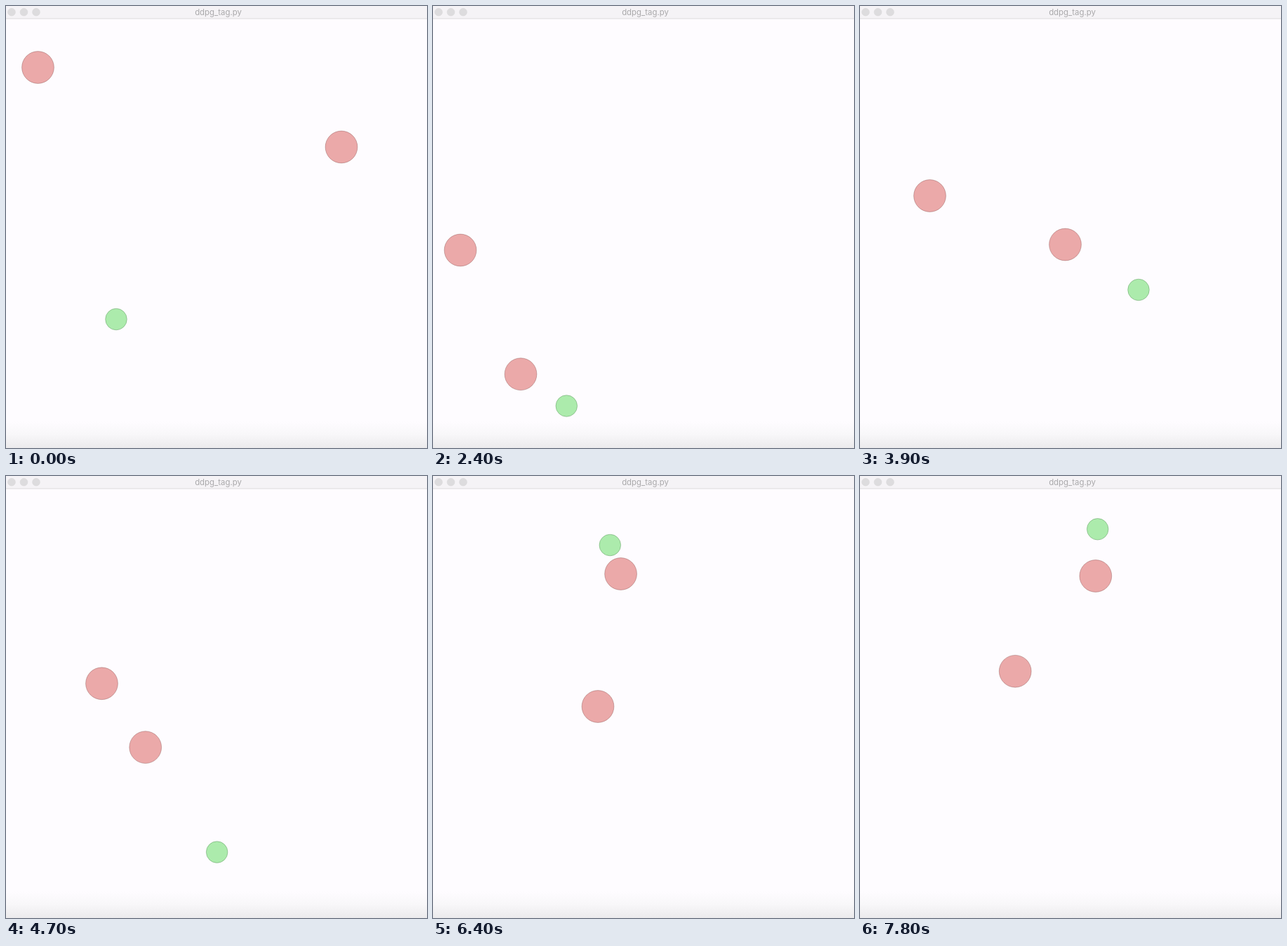
Recreate the animation shown at these times as an HTML page. Size 600 by 630 pixels, loop 7900 ms.

```html
<!DOCTYPE html>
<html lang="en">
<head>
<meta charset="utf-8">
<title>Tag</title>
<style>
  html, body { margin: 0; width: 100%; height: 100%; overflow: hidden; background: #fefcff; }
  svg { display: block; width: 600px; height: 630px; }
  text { font: 400 11.4px Inter, Roboto, sans-serif; fill: #aaa9ab; text-anchor: middle; }
  .chaser { fill: rgba(217, 88, 85, .5); stroke: rgba(108, 45, 45, .4); }
  .runner { fill: rgba(89, 217, 89, .5); stroke: rgba(45, 108, 45, .4); }
  .chaser, .runner { stroke-width: .8; }
  .button { fill: #dddcde; stroke: #d6d5d7; stroke-width: .5; }
</style>
</head>
<body>
<svg viewBox="0 0 600 630">
  <defs>
    <linearGradient id="shade" x1="0" y1="0" x2="0" y2="1">
      <stop offset="0" stop-color="#fefcff"/>
      <stop offset=".5" stop-color="#f8f7f9"/>
      <stop offset="1" stop-color="#ebeaec"/>
    </linearGradient>
  </defs>
  <rect width="600" height="630" fill="#fefcff"/>
  <rect y="592" width="600" height="38" fill="url(#shade)"/>
  <rect width="600" height="18" fill="#f5f3f6"/>
  <rect y="17.5" width="600" height="1" fill="#dddcde"/>
  <circle class="button" cx="8" cy="8.7" r="5.4"/>
  <circle class="button" cx="25.5" cy="8.7" r="5.4"/>
  <circle class="button" cx="43" cy="8.7" r="5.4"/>
  <text x="302.5" y="13">ddpg_tag.py</text>
  <circle id="guard" class="chaser" r="22.9"/>
  <circle id="hunter" class="chaser" r="22.9"/>
  <circle id="runner" class="runner" r="15.3"/>
</svg>
<script>
const STEP = 100, LOOP = 7900, TAU = 2 * Math.PI;
const MIN_SWEEP = 4.4;

// Key poses; the runner circles the field between them
const poses = [
  { at: 0,  guard: [45.5, 87.5],   hunter: [478, 201],     runner: [157, 446.5] },
  { at: 10, guard: [130, 344],     hunter: [181.5, 411],   runner: [108.2, 403.5] },
  { at: 24, guard: [39, 348],      hunter: [125, 524.7],   runner: [190.3, 570] },
  { at: 39, guard: [99.5, 270.5],  hunter: [292.5, 340],   runner: [397, 404.5] },
  { at: 55, guard: [173.5, 321],   hunter: [276.3, 333],   runner: [205.8, 314] },
  { at: 64, guard: [235, 328.5],   hunter: [267.6, 139.5], runner: [252.3, 98.5] },
  { at: 78, guard: [221.2, 278.3], hunter: [335.8, 142.5], runner: [338.7, 75.8] }
];

const mix = (a, b, u) => a + (b - a) * u;
const mixPoint = (p, q, u) => [mix(p[0], q[0], u), mix(p[1], q[1], u)];

function leg(step) {
  let i = 0;
  while (i < poses.length - 2 && step >= poses[i + 1].at) i++;
  const from = poses[i], to = poses[i + 1];
  const u = (step - from.at) / (to.at - from.at);
  const spin = i === poses.length - 2 ? 1 : -1;
  return { from, to, u, spin, swell: Math.sin(Math.PI * u) };
}

// Elliptical track that sinks and flattens, then rises again
function track(step) {
  const dip = Math.max(0, Math.sin(Math.PI * step / 60));
  return { x: 270, y: 262 + 170 * dip, rx: 235, ry: 200 - 50 * dip };
}

function polar([x, y], step) {
  const t = track(step), dx = (x - t.x) / t.rx, dy = (y - t.y) / t.ry;
  return { angle: Math.atan2(dy, dx), radius: Math.hypot(dx, dy) };
}

function runnerAt(step) {
  const { from, to, u, spin, swell } = leg(step);
  const a = polar(from.runner, from.at), b = polar(to.runner, to.at);
  let sweep = ((spin * (b.angle - a.angle)) % TAU + TAU) % TAU;
  if (sweep < MIN_SWEEP) sweep += TAU;
  const angle = a.angle + spin * sweep * u;
  const radius = mix(mix(a.radius, b.radius, u), 1, Math.sqrt(Math.max(0, swell)));
  const t = track(step);
  return [t.x + t.rx * radius * Math.cos(angle), t.y + t.ry * radius * Math.sin(angle)];
}

// Leans towards where the runner was a moment ago
function hunterAt(step) {
  const { from, to, u, swell } = leg(step);
  const trail = runnerAt(Math.max(0, step - 2));
  return mixPoint(mixPoint(from.hunter, to.hunter, u), trail, .4 * swell);
}

function guardAt(step) {
  const { from, to, u } = leg(step);
  return mixPoint(from.guard, to.guard, u);
}

const discs = { guard: guardAt, hunter: hunterAt, runner: runnerAt };
const start = performance.now();

function draw() {
  const step = Math.floor((performance.now() - start) % LOOP / STEP);
  for (const [id, placeAt] of Object.entries(discs)) {
    const [x, y] = placeAt(step);
    const node = document.getElementById(id);
    node.setAttribute("cx", x.toFixed(2));
    node.setAttribute("cy", y.toFixed(2));
  }
  requestAnimationFrame(draw);
}
draw();
</script>
</body>
</html>
```
